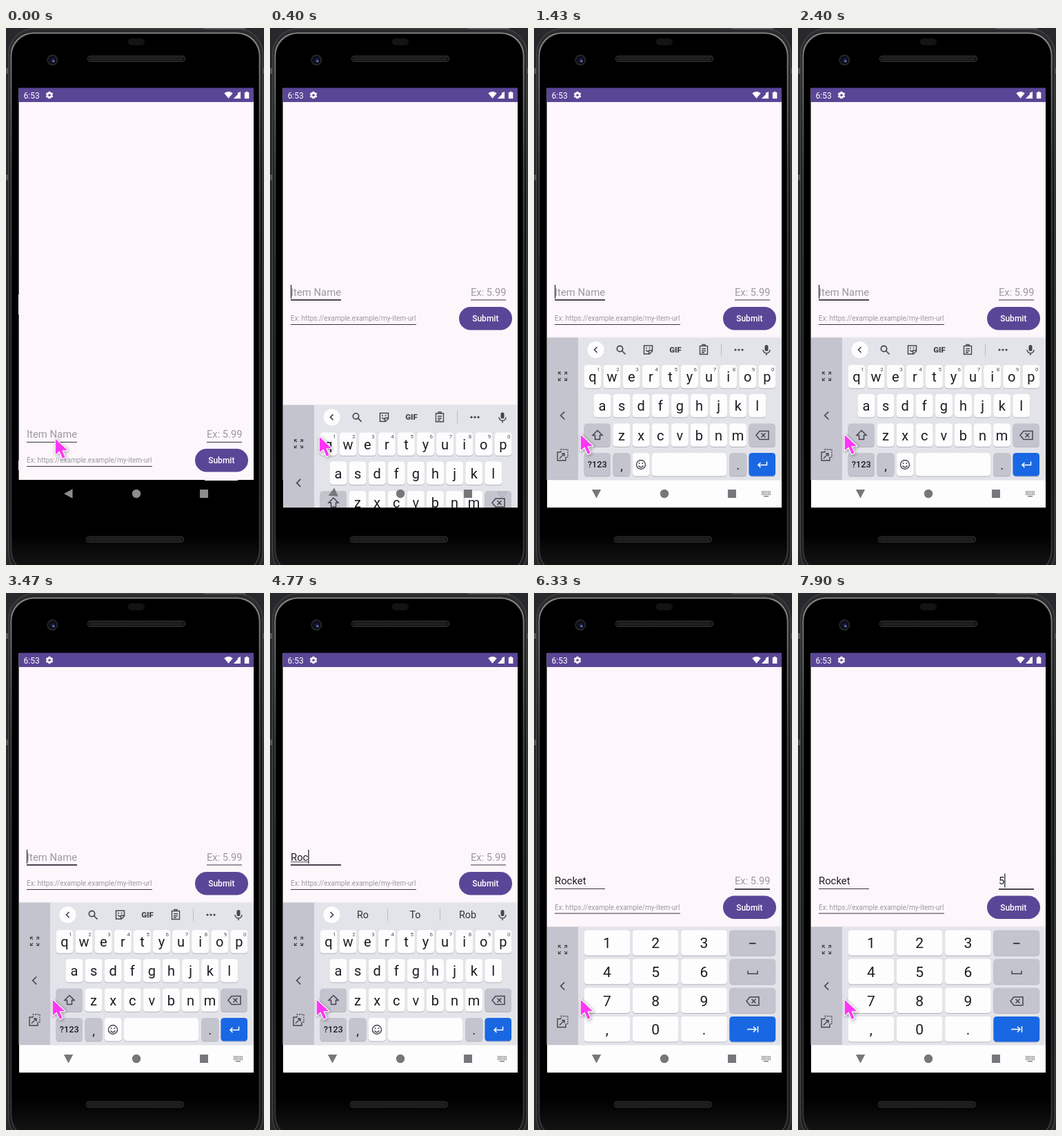
An HTML page with a canvas that plays this animation: 374 by 776 pixels, repeating every 8 s.

```html
<!DOCTYPE html>
<html lang="en">
<head>
<meta charset="utf-8">
<title>Shopping list form</title>
<style>
  html, body { margin: 0; width: 100%; height: 100%; overflow: hidden; background: #28292d; }
  canvas { display: block; width: 374px; height: 776px; }
</style>
</head>
<body>
<canvas id="stage"></canvas>
<script>
const LOOP = 8000, W = 374, H = 776;
const INK = '#1d1d20', ICON = '#45464c', PURPLE = '#5a4696', PAPER = '#fdf7fc';
const KEY = '#fdfdfe', SIDE = '#c3c4ce', BOARD = '#e3e4ea', BLUE = '#1967e3';

const canvas = document.getElementById('stage');
const ctx = canvas.getContext('2d');
const ratio = window.devicePixelRatio || 1;
canvas.width = W * ratio;
canvas.height = H * ratio;

// Timeline in ms
const FOCUS_NAME = 100, SLIDE = 320, SLIDE_TIME = 305;
const FOCUS_PRICE = 5830, NUMBER_PAD = 5900, TYPE_PRICE = 7670;
const TYPED = [[0, ''], [4200, 'R'], [4570, 'Ro'], [4770, 'Roc'], [4970, 'Rock'], [5200, 'Rocke'], [5400, 'Rocket']];
const HINTS = [[0, null], [4270, ['R', 'Are', 'Re']], [4630, ['Ro', 'To', 'Rob']], [4830, ['Roc', 'Rock', 'Rocky']],
  [5030, ['Rock', 'Rocky', 'Rocket']], [5260, ['Rocke', 'Rocket', 'Rocked']], [5460, ['Rocket', 'Rockets', 'Rocker']]];
const POINTER = [[0, 4, 6], [60, 4, 6], [250, 4, 3], [560, 4, 3], [850, 0, 0]];

const clamp = v => Math.max(0, Math.min(1, v));
const stepAt = (table, t) => table.filter(row => row[0] <= t).pop();

function pointerAt(t) {
  const i = POINTER.findIndex(p => p[0] > t);
  if (i < 0) return [0, 0];
  const [t0, x0, y0] = POINTER[i - 1], [t1, x1, y1] = POINTER[i];
  const k = (t - t0) / (t1 - t0);
  return [x0 + (x1 - x0) * k, y0 + (y1 - y0) * k];
}

function rect(x, y, w, h, fill, r = 0) {
  ctx.fillStyle = fill;
  ctx.beginPath();
  ctx.roundRect(x, y, w, h, r);
  ctx.fill();
}
function disc(x, y, r, fill) {
  ctx.fillStyle = fill;
  ctx.beginPath();
  ctx.arc(x, y, r, 0, 7);
  ctx.fill();
}
function text(str, x, y, size, color = INK, align = 'left', weight = 400) {
  ctx.font = `${weight} ${size}px Roboto, sans-serif`;
  ctx.textAlign = align;
  ctx.fillStyle = color;
  ctx.fillText(str, x, y);
  return ctx.measureText(str).width;
}
function at(x, y, draw) {
  ctx.save();
  ctx.translate(x, y);
  draw();
  ctx.restore();
}
function line(d, x, y, color = ICON, width = 1.5) {
  at(x, y, () => {
    ctx.strokeStyle = color;
    ctx.lineWidth = width;
    ctx.stroke(new Path2D(d));
  });
}
function shape(d, x, y, color) {
  at(x, y, () => {
    ctx.fillStyle = color;
    ctx.fill(new Path2D(d));
  });
}
function fade(x0, y0, x1, y1, ...colors) {
  const g = ctx.createLinearGradient(x0, y0, x1, y1);
  colors.forEach((c, i) => g.addColorStop(i / (colors.length - 1), c));
  return g;
}

function speaker(x, y) {
  rect(x, y, 142, 9, '#3a3a3a', 4.5);
  rect(x + 1, y + 1, 140, 7, '#101010', 3.5);
  for (let i = 0; i < 45; i++) line('M0 2L3 7M3 2L0 7', x + 3.5 + i * 3, y, '#343434', 0.7);
}

function drawPhone() {
  rect(0, 0, W, H, '#28292d');
  for (const y of [58, 212]) rect(0, y, 5, 8, '#55565a');
  rect(371, 58, 3, 8, '#55565a');
  rect(3, 0, 370, 795, '#424345', 38);
  rect(4.5, 1.5, 367, 792, fade(0, 0, 0, 790, '#2c2c2d', '#161617', '#141415', '#1a1a1b'), 36);
  rect(6.5, 6.5, 362, 782, fade(0, 6, 0, 788, '#8a8a8a', '#4a4a4a', '#363636', '#303030', '#3a3a3a'), 33);
  rect(8.3, 8.3, 358.4, 779, fade(0, 730, 0, 776, '#000', '#131313'), 32);
  rect(287, 0, 60, 2, '#56575a');
  rect(177, 15, 24, 10, '#131313', 5);
  disc(67.3, 46.3, 8, '#25262b');
  disc(67.3, 46.3, 6, '#0c0d14');
  disc(68, 47, 3, '#1d2350');
  disc(69, 48, 1.3, '#7f8fd0');
  speaker(118, 40);
  speaker(116, 734.5);
}

function drawStatusBar() {
  rect(18.6, 86.6, 340.4, 20.4, PURPLE);
  text('6:53', 25.5, 101.5, 12, '#fff');
  at(63, 97, () => {
    for (let i = 0; i < 6; i++) {
      ctx.rotate(Math.PI / 3);
      rect(-1.5, -5.3, 3, 3, '#fff', 0.5);
    }
    ctx.strokeStyle = '#fff';
    ctx.lineWidth = 2.2;
    ctx.beginPath();
    ctx.arc(0, 0, 2.9, 0, 7);
    ctx.stroke();
  });
  shape('M0 9.5L-6.2 2Q0-3 6.2 2Z', 322.5, 92.3, '#fff');
  shape('M0 10H10V0Z', 330, 92, '#ffffff70');
  shape('M0 10H7V3Z', 330, 92, '#fff');
  shape('M5.5 2L10 0V10H7V5Z', 330, 92, '#fff');
  shape('M0 1.3H2V0H4.5V1.3H6.5V10.3H0Z', 345.8, 91.8, '#fff');
}

// Bright slivers along the edge of the idle screen
function drawEdgeGlints() {
  rect(18, 385, 1, 29, PAPER);
  rect(18, 625, 1, 14, PAPER);
  rect(288, 653, 48, 1, PAPER);
}

function underline(x, y, w, focused) {
  if (focused) rect(x, Math.floor(y), w, 2, '#49454f');
  else rect(x, y, w, 1, '#39363d');
}

function drawForm(t) {
  const lifted = t >= SLIDE, pad = t >= NUMBER_PAD;
  const top = pad ? 34.5 : lifted ? 0 : 205.5;
  const low = pad ? 34.5 : lifted ? 0 : 205;
  const onPrice = t >= FOCUS_PRICE, onName = t >= FOCUS_NAME && !onPrice;
  const name = stepAt(TYPED, t)[1], price = t >= TYPE_PRICE ? '5' : '';
  const base = 386.7 + top, hint = '#9b989d';

  const nameWidth = text(name, 30, base, 14.85);
  if (!name) text('Item Name', 30, base, 14.85, hint);
  if (name && onName) rect(30, base + 1.5, nameWidth, 1, '#55525a');
  const priceWidth = text(price, 291, base, 14.7);
  if (!price) text('Ex: 5.99', 291, base, 14.7, hint);
  underline(30, 392.5 + top, 73, onName);
  underline(291, 392.5 + top, 51, onPrice);

  text('Ex: https://example.example/my-item-url', 30, 423.4 + low, 10.05, hint);
  underline(30, 428 + low, 182, false);
  rect(274, 403 + low, 77, 33.5, PURPLE, 16.75);
  text('Submit', 312.3, 424.2 + low, 12, '#fff', 'center', 500);

  const typing = t >= 4200 && t < FOCUS_PRICE;
  const since = price ? t - TYPE_PRICE : onPrice ? t - FOCUS_PRICE : t - FOCUS_NAME;
  const lit = typing || since % 1000 < 500;
  if (lit && (onName || onPrice)) {
    rect((onPrice ? 291 + priceWidth : 30 + nameWidth) - 0.2, 371 + top, 1.5, 20, '#45414f');
  }
}

function key(x, y, w, h, label, fill = KEY, size = 20) {
  rect(x, y + 1, w, h, '#b2b3bc', 4.5);
  rect(x, y, w, h, fill, 4.5);
  if (label) text(label, x + w / 2, y + h / 2 + size * 0.375, size, INK, 'center');
}

const backspace = (x, y) => line('M-9 0L-4-6H9V6H-4ZM-1.5-3L4.5 3M4.5-3L-1.5 3', x, y);
const chevron = (x, y, dir = -1, s = 4) =>
  line(`M${-dir * s / 2} ${-s}L${dir * s / 2} 0L${-dir * s / 2} ${s}`, x, y, ICON, 1.7);

function sidePanel(top, ys) {
  rect(19, top, 340, 211, BOARD);
  rect(19, top - 1, 340, 1, '#eeeaf1');
  rect(19, top, 45, 653 - top, SIDE);
  line('M-6-2.5V-6H-2.5M2.5-6H6V-2.5M6 2.5V6H2.5M-2.5 6H-6V2.5M-6-6L-2.5-2.5M6-6L2.5-2.5M6 6L2.5 2.5M-6 6L-2.5 2.5',
    41.5, ys[0] + 0.3, ICON, 1.2);
  chevron(41.5, ys[1], -1, 5.5);
  line('M-2-4H-7V8H5V3M-4 5L3-2M-1-2H3V2', 41, ys[2], ICON, 1.4);
  ctx.setLineDash([2, 1.5]);
  line('M-2-4V-8H8V3H5', 41, ys[2], ICON, 1.3);
  ctx.setLineDash([]);
}

function mic() {
  rect(334.5, 458, 5, 9, ICON, 2.5);
  line('M-5 0A5 5 0 0 0 5 0M0 5V8', 337, 465, ICON, 1.5);
}

function toolbar(hints) {
  disc(89.5, 465, 12, KEY);
  chevron(89.5, 465, hints ? 1 : -1);
  mic();
  if (hints) {
    hints.forEach((word, i) => text(word, 134.5 + i * 76, 470, 14.3, '#303136', 'center'));
    for (const x of [170, 246]) rect(x, 456, 1, 18, '#bcbdc5');
    return;
  }
  line('M3.2-1A4.2 4.2 0 1 1-5.2-1A4.2 4.2 0 1 1 3.2-1M2 2L7 7', 125.5, 464.5, ICON, 1.7);
  line('M-6-6H6V2L2 6H-6ZM6 1H1V6M-3 0Q-2 3 0 2', 165.5, 465, ICON, 1.5);
  for (const x of [163, 167.5]) disc(x, 462.5, 1, ICON);
  text('GIF', 205, 469, 11.5, ICON, 'center', 900);
  line('M-5.5-5H5.5V7H-5.5ZM-2-5V-7H2V-5M-3-1H3M-3 2H3M-3 4.5H1', 246, 464.5, ICON, 1.4);
  rect(271, 456, 1, 18, '#bcbdc5');
  for (const dx of [-5, 0, 5]) disc(297 + dx, 465, 1.6, ICON);
}

function letterBoard(hints) {
  sidePanel(447.5, [503, 560, 617]);
  toolbar(hints);
  const pitch = 28.1, w = 25, h = 33.5;
  const row = (letters, x, y) => [...letters].forEach((c, i) => key(x + i * pitch, y, w, h, c));
  row('qwertyuiop', 72.5, 487);
  [...'1234567890'].forEach((d, i) => text(d, 93.3 + i * pitch, 495.6, 8, '#4c4d53', 'center'));
  row('asdfghjkl', 86.5, 529);
  row('zxcvbnm', 114.5, 571.5);
  key(72.5, 571.5, 38.5, h, '', SIDE);
  line('M0-7L7 0H3.5V6H-3.5V0H-7Z', 92, 588.5);
  key(311.5, 571.5, 38.5, h, '', SIDE);
  backspace(331, 588.5);
  key(72.5, 614, 38.5, h, '', SIDE);
  text('?123', 91.7, 635.3, 12.8, INK, 'center', 500);
  key(114.5, 614, w, h, '', SIDE);
  text(',', 127, 639, 19, INK, 'center');
  key(142.7, 614, w, h);
  line('M6.5 0A6.5 6.5 0 1 1-6.5 0A6.5 6.5 0 1 1 6.5 0M-3.5 1.5Q0 6 3.5 1.5', 155, 631, ICON, 1.4);
  for (const x of [152.7, 157.3]) disc(x, 629, 1, ICON);
  key(171, 614, 108, h);
  key(283.3, 614, w, h, '', SIDE);
  text('.', 295.8, 638, 19, INK, 'center');
  key(311.5, 614, 38.5, h, '', BLUE);
  line('M6.5-4V1H-6M-2.5-2.5L-6 1L-2.5 4.5', 331, 630.5, '#fff', 1.5);
}

function numberBoard() {
  sidePanel(482.5, [515, 568, 619.5]);
  ['123', '456', '789', ',0.'].forEach((digits, r) => {
    const y = 487.2 + r * 41.6;
    [...digits].forEach((d, c) => key(72.5 + c * 70.3, y, 66.8, 36.5, d, KEY, 21));
    key(283.4, y, 66.8, 36.5, '', r === 3 ? BLUE : SIDE);
  });
  rect(312, 505.6, 9.5, 1.6, INK);
  line('M-7-2V2.5H7V-2', 317, 547.8);
  backspace(317, 589.7);
  line('M-8 0H4M1-4L5 0L1 4M7.5-4.5V4.5', 317, 630.5, '#fff', 1.5);
}

function drawNav(turn) {
  const gray = turn > 0 ? '#76777a' : '#8d8d8d';
  at(90.5, 673, () => {
    ctx.rotate(-turn * Math.PI / 2);
    shape('M-6.5 0L6-6.7V6.7Z', 0, 0, gray);
  });
  disc(189, 673, 6.2, gray);
  rect(281, 667, 12, 12, gray);
  ctx.globalAlpha = turn;
  for (let r = 0; r < 3; r++)
    for (let c = 0; c < 6; c++) rect(330 + c * 2.3, 669 + r * 2.3, 1.4, 1.4, gray);
  rect(333, 676, 7, 1.4, gray);
  ctx.globalAlpha = 1;
}

function drawPointer(t) {
  const [dx, dy] = pointerAt(t);
  const arrow = new Path2D('M1.2 2.5V26.5L7.3 21.5L12 32.5L16 30.7L11.4 20H19.8Z');
  at(66.7 + dx, 585.6 + dy, () => {
    ctx.scale(0.93, 0.93);
    ctx.lineJoin = 'round';
    ctx.shadowColor = '#0006';
    ctx.shadowBlur = 4 * ratio;
    ctx.shadowOffsetX = ctx.shadowOffsetY = ratio;
    ctx.strokeStyle = '#fff';
    ctx.lineWidth = 2.6;
    ctx.stroke(arrow);
    ctx.shadowColor = 'transparent';
    ctx.fillStyle = '#ff35f5';
    ctx.fill(arrow);
  });
}

function draw(t) {
  ctx.setTransform(ratio, 0, 0, ratio, 0, 0);
  drawPhone();
  rect(18.6, 87, 340.4, 566, PAPER);
  drawStatusBar();
  if (t < SLIDE) drawEdgeGlints();
  drawForm(t);

  const p = clamp((t - SLIDE) / SLIDE_TIME);
  if (p > 0) {
    ctx.save();
    ctx.beginPath();
    ctx.rect(19, 87, 340, 606);
    ctx.clip();
    ctx.translate(0, 246 * (1 - p) ** 3);
    if (t < NUMBER_PAD) letterBoard(stepAt(HINTS, t)[1]);
    else numberBoard();
    rect(19, 653.5, 340, 40, '#fdfdfd');
    ctx.restore();
  }
  drawNav(p);
  drawPointer(t);
}

const start = performance.now();
function tick() {
  draw((performance.now() - start) % LOOP);
  requestAnimationFrame(tick);
}
tick();
</script>
</body>
</html>
```
